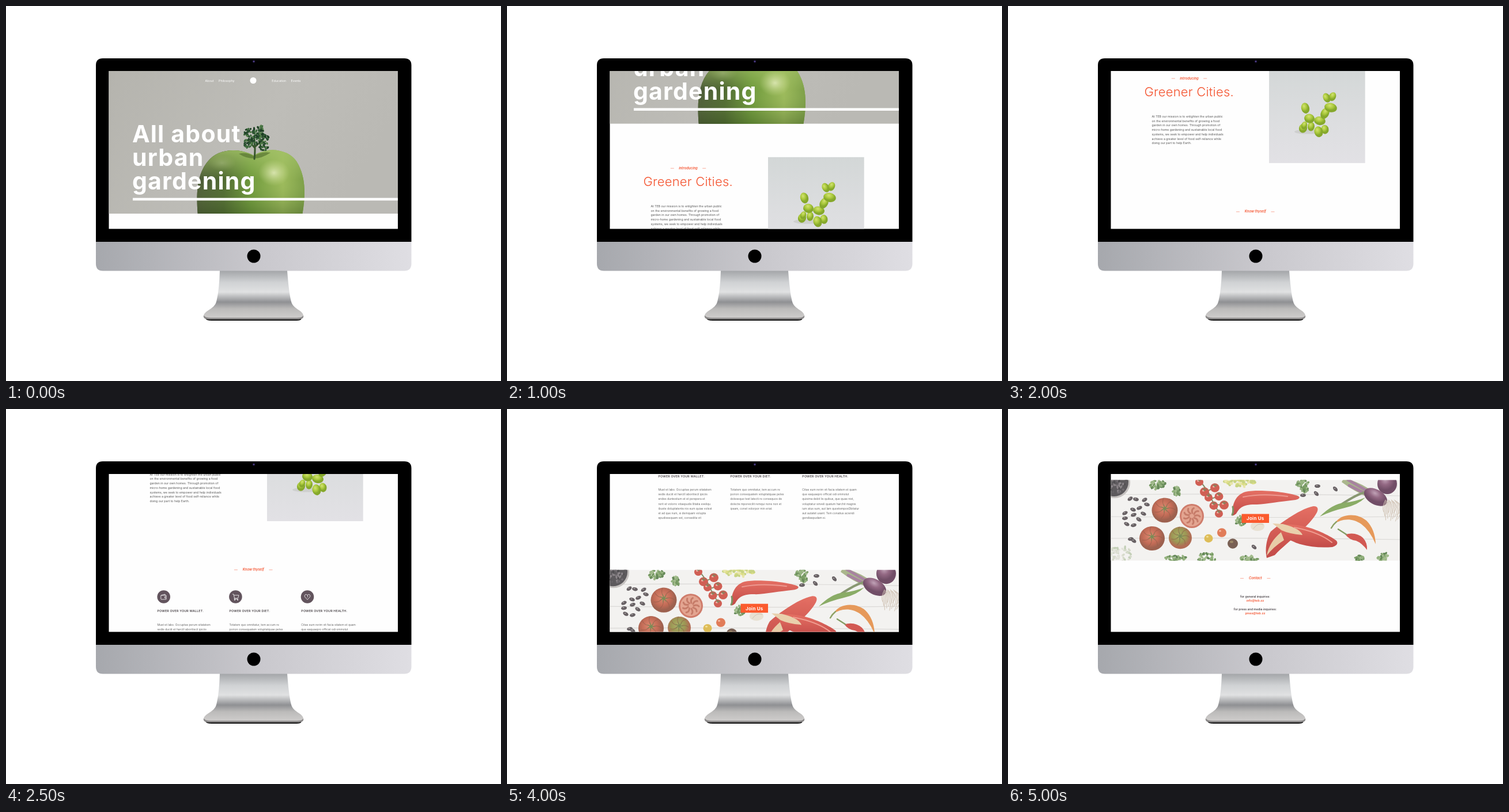
An HTML page for the animation above (7500 ms loop, 859 by 652 pixels).

```html
<!DOCTYPE html>
<html lang="en">
<head>
<meta charset="utf-8">
<title>Urban gardening</title>
<style>
html, body { margin: 0; width: 100%; height: 100%; overflow: hidden; background: #fff; }
svg { display: block; width: 859px; height: 652px; font-family: Inter, "Open Sans", sans-serif; }
.nav { font-size: 5.3px; fill: #fff; }
.headline { font-size: 41px; font-weight: 700; letter-spacing: 1.2px; fill: #fff; }
.title { font-size: 22px; font-weight: 300; letter-spacing: .2px; fill: #f4532f; }
.body { font-size: 5.2px; fill: #555; }
.column { font-size: 4.9px; fill: #666; }
.heading { font-size: 5.3px; font-weight: 600; letter-spacing: .2px; fill: #4c464a; }
.label { font-size: 5.9px; font-weight: 600; font-style: italic; fill: #f4532f; text-anchor: middle; }
.contact { font-size: 5.2px; font-weight: 600; fill: #4c464a; text-anchor: middle; }
.mail { fill: #f4532f; }
.button { font-size: 8px; font-weight: 700; letter-spacing: .2px; fill: #fff; text-anchor: middle; }
.icon { fill: none; stroke: #fff; stroke-width: .8; stroke-linejoin: round; }
.stroke { fill: none; stroke-linecap: round; }
</style>
</head>
<body>
<svg viewBox="0 0 859 652">
  <defs>
    <clipPath id="screen"><rect x="178.5" y="113" width="501.5" height="274.5"/></clipPath>
    <clipPath id="hero"><rect x="178" y="113" width="502" height="248"/></clipPath>
    <clipPath id="banner"><rect x="178" y="123.5" width="502" height="140"/></clipPath>
    <linearGradient id="chin"><stop stop-color="#a6a8ad"/><stop offset=".5" stop-color="#c8c7cc"/><stop offset="1" stop-color="#dfdee3"/></linearGradient>
    <linearGradient id="stand" x2="0" y2="1">
      <stop stop-color="#a3a5a8"/><stop offset=".25" stop-color="#d0d2d4"/><stop offset=".45" stop-color="#e0e1e2"/>
      <stop offset=".66" stop-color="#8f9093"/><stop offset=".8" stop-color="#bcbbba"/><stop offset="1" stop-color="#cfcdcc"/>
    </linearGradient>
    <linearGradient id="wall" x2="1" y2=".3"><stop stop-color="#b5b4ae"/><stop offset=".6" stop-color="#bebdb8"/><stop offset="1" stop-color="#bab9b4"/></linearGradient>
    <linearGradient id="apple"><stop stop-color="#4c5a38"/><stop offset=".25" stop-color="#4f6932"/><stop offset=".5" stop-color="#6f9a3c"/><stop offset=".8" stop-color="#9dbb5c"/><stop offset="1" stop-color="#7d9f48"/></linearGradient>
    <linearGradient id="appleTop" x2="0" y2="1"><stop stop-color="#a3c268" stop-opacity=".8"/><stop offset=".45" stop-color="#a3c268" stop-opacity="0"/><stop offset="1" stop-color="#2c4417" stop-opacity=".35"/></linearGradient>
    <radialGradient id="shine"><stop stop-color="#edf3c9" stop-opacity=".75"/><stop offset="1" stop-color="#d5e39b" stop-opacity="0"/></radialGradient>
    <linearGradient id="studio" x2="0" y2="1"><stop stop-color="#d3d7d7"/><stop offset=".6" stop-color="#dddee0"/><stop offset="1" stop-color="#e2e1e5"/></linearGradient>
    <radialGradient id="grape" cx=".4" cy=".3"><stop stop-color="#d3e273"/><stop offset=".6" stop-color="#aac93c"/><stop offset="1" stop-color="#86a82c"/></radialGradient>
    <radialGradient id="tomato" cx=".45" cy=".4"><stop stop-color="#d9785c"/><stop offset=".65" stop-color="#b9553d"/><stop offset="1" stop-color="#8e4a35"/></radialGradient>
    <radialGradient id="greenTomato" cx=".45" cy=".4"><stop stop-color="#a4a552"/><stop offset=".6" stop-color="#8c8a3c"/><stop offset="1" stop-color="#a5573b"/></radialGradient>
    <radialGradient id="onion" cx=".4" cy=".3"><stop stop-color="#b795ac"/><stop offset=".5" stop-color="#835271"/><stop offset="1" stop-color="#5c3450"/></radialGradient>
    <linearGradient id="pepper" x2="0" y2="1"><stop stop-color="#e05a4c"/><stop offset="1" stop-color="#b92f2c"/></linearGradient>
  </defs>
  <rect width="859" height="652" fill="#fff"/>

  <path d="M347 541H512Q515 547 504 547H357Q344 547 347 541Z" fill="#0b0b0b"/>
  <path d="M371 460H488Q491 500 495 514C498 527 516 529 516 539Q516 543 505 543H354Q343 543 343 539C343 530 362 527 365 514Q370 495 371 460Z" fill="url(#stand)"/>
  <path d="M343 538Q346 542 355 542H505Q514 542 516 538Q518 545 505 545H354Q341 545 343 538Z" fill="#8b8989"/>
  <path d="M156 410V103Q156 91 168 91H691Q703.500 91 703.500 103V410Z" fill="#000"/>
  <path d="M156 410H703.500V448Q703.500 460.500 691 460.500H168Q156 460.500 156 448Z" fill="url(#chin)"/>
  <circle cx="430" cy="435" r="11.500" fill="#000"/>
  <circle cx="430" cy="96.500" r="2" fill="#30215c"/><circle cx="430" cy="96.500" r=".8" fill="#6d63a8"/>

  <g clip-path="url(#screen)">
    <rect x="178" y="113" width="503" height="275" fill="#fefefe"/>
    <g id="page">
      <g clip-path="url(#hero)">
        <rect x="178" y="113" width="502" height="248" fill="url(#wall)"/>
        <g id="appleShape">
          <path id="body" d="M333 364C329 320 333 287 354 266C373 247 407 247 430 260C452 245 488 247 504 270C521 296 520 330 514 364Z" fill="url(#apple)"/>
          <use href="#body" style="fill:url(#appleTop)"/>
          <path d="M333 364C329 320 333 287 354 266C373 247 407 247 430 260C452 245 488 247 504 270C521 296 520 330 514 364Z" fill="url(#appleTop)"/>
          <ellipse cx="465" cy="290" rx="27" ry="23" fill="url(#shine)"/>
          <ellipse cx="375" cy="273" rx="24" ry="14" fill="url(#shine)" opacity=".3"/>
          <path d="M404 257Q431 274 459 255Q444 252 430 261Q417 253 404 257Z" fill="#53702d" opacity=".65"/>
        </g>
        <path d="M431 266Q433 248 431 232M432 247L421 234M432 245L446 232" class="stroke" stroke="#38562c" stroke-width="3"/>
        <g id="sprig"></g>
      </g>
      <g class="nav"><text x="345.500" y="131.800">About</text><text x="369" y="131.800">Philosophy</text><text x="461.300" y="131.800">Education</text><text x="494.600" y="131.800">Events</text></g>
      <circle cx="429" cy="129.500" r="5.500" fill="#fff"/>
      <rect x="220" y="333.700" width="460" height="4.500" fill="#fff"/>

      <text class="title" x="236.500" y="469">Greener Cities.</text>
      <rect x="453" y="419" width="166.700" height="166.500" fill="url(#studio)"/>
      <ellipse cx="521" cy="531" rx="24" ry="4" fill="#aeb2a8" opacity=".35"/>
      <g id="grapes" fill="url(#grape)"></g>

      <g id="icons" fill="#62545d"><circle cx="273.700" cy="717" r="11.300"/><circle cx="398.400" cy="717" r="11.300"/><circle cx="523" cy="717" r="11.300"/></g>
      <g class="icon">
        <path d="M269.500 714.500H278V721.500H269.500Q268.800 721.500 268.800 720.500V714.500L276 712.500V714.500M278 716.800H275.500V719.200H278"/>
        <path d="M393 712.500H395L396.500 719.500H402.500L404 714.300H395.500M396.500 719.500L396 721H403"/><circle cx="397" cy="722.500" r=".7"/><circle cx="402" cy="722.500" r=".7"/>
        <path d="M523 722L518.800 717.500C516.500 714 521 711 523 714.500C525 711 529.500 714 527.200 717.500ZM523 714.500L524 716.500L522.500 718"/>
      </g>

      <g transform="translate(0 781)">
        <g clip-path="url(#banner)">
          <rect x="178" y="123" width="502" height="141" fill="#f1f0ee"/>
          <path d="M178 149Q420 146 680 151M178 187Q450 190 680 187M178 225Q400 223 680 227" class="stroke" stroke="#d5d3d0" stroke-width="1.200"/>
          <circle cx="185" cy="128" r="27" fill="#bdb9b7"/><circle cx="184" cy="127" r="25" fill="#454245"/>
          <g id="bowl"></g>
          <g id="greens"></g>
          <g id="beans" fill="#514a4d"></g>
          <path d="M333 125Q350 146 354 158T370 183M342 144L359 137M352 156L366 152M357 166L375 167" class="stroke" stroke="#718053" stroke-width="2"/>
          <g id="tomatoes"></g>
          <circle cx="319" cy="186" r="21" fill="#c86955"/><circle cx="319" cy="186" r="18" fill="#df9780"/>
          <g id="slice" class="stroke" stroke="#bd6853" stroke-width="3"></g>

          <path d="M389 184C389 165 395 149 412 144C435 139 483 144 503 151Q510 155 499 158C470 161 451 165 432 166C407 165 401 173 396 182Q390 187 389 184Z" fill="url(#pepper)"/>
          <path d="M408 153Q440 146 485 152" class="stroke" stroke="#f2a298" stroke-width="2" opacity=".7"/>
          <path d="M389 184Q392 178 390 170" class="stroke" stroke="#69824b" stroke-width="3"/>
          <path d="M449 259C445 242 450 222 456 213C476 195 509 173 530 169Q541 169 536 180C521 207 482 233 463 254Z" fill="url(#pepper)"/>
          <path d="M449 255C452 238 461 225 474 214L479 228Q460 240 449 255Z" fill="#e4c49b"/>
          <path d="M470 203C500 194 548 213 570 229Q575 236 563 240C528 243 492 235 475 217Z" fill="url(#pepper)"/>
          <path d="M459 199L477 200C500 206 508 212 511 219Q488 217 475 211Z" fill="#e6c9a0"/>
          <path d="M497 206Q540 214 562 232" class="stroke" stroke="#ee8f82" stroke-width="2"/>

          <path d="M583 120Q613 128 632 143L628 155Q600 143 579 127Z" fill="#9dab7b"/>
          <path d="M590 123L631 147M592 133L628 151" class="stroke" stroke="#9a7191" stroke-width="5"/>
          <path d="M619 145Q606 148 580 165" class="stroke" stroke="#77895d" stroke-width="4"/>
          <path d="M541 187Q563 165 583 163T620 154Q607 167 584 172Q562 177 541 187Z" fill="#79a04f"/>
          <ellipse cx="658" cy="130" rx="17" ry="18" fill="url(#onion)"/>
          <ellipse cx="638" cy="153" rx="22" ry="13" transform="rotate(30 638 153)" fill="url(#onion)"/>
          <g id="roots" class="stroke" stroke="#c9b9a8" stroke-width="1"></g>
          <path d="M567 199C577 181 606 180 622 194Q637 209 638 235Q628 211 613 200C594 187 577 193 567 199Z" fill="#e28a41"/>
          <path d="M561 207Q564 201 570 196" class="stroke" stroke="#7d944f" stroke-width="2.500"/>
          <path d="M585 218Q604 213 616 224Q624 233 623 245Q614 233 604 229Q593 228 585 218Z" fill="#cb4039"/>
          <path d="M573 209L587 218" class="stroke" stroke="#74904e" stroke-width="2.500"/>
          <ellipse cx="433" cy="204" rx="12" ry="8" fill="#e4dccb"/><path d="M426 208Q433 197 443 201" class="stroke" stroke="#c9bda9"/>
          <rect x="178" y="123" width="502" height="141" fill="#fff" opacity=".13"/>
        </g>
        <rect x="405.500" y="182.500" width="47.500" height="15.500" fill="#fb5a2e"/>
        <text class="button" x="429.300" y="193.400">Join Us</text>
      </g>
    </g>
  </g>
</svg>
<script>
const $ = id => document.getElementById(id);
const add = (id, markup) => $(id).insertAdjacentHTML("beforeend", markup);

let seed = 7;
const random = () => (seed = seed * 16807 % 2147483647) / 2147483647;
const pick = list => list[Math.floor(random() * list.length)];

const ellipse = (x, y, rx, ry, turn = 0, fill = "") =>
  `<ellipse cx="${x}" cy="${y}" rx="${rx}" ry="${ry}" transform="rotate(${turn} ${x} ${y})" ${fill && `fill="${fill}"`}/>`;

const lines = (style, x, y, pitch, rows) => add("page", rows.map((row, i) =>
  `<text class="${style}" x="${x}" y="${y + i * pitch}">${row}</text>`).join(""));

// Loose cluster of small leaves inside an ellipse
function foliage(id, x, y, rx, ry, count, size, colors) {
  for (let i = 0; i < count; i++) {
    const angle = random() * Math.PI * 2, reach = Math.sqrt(random());
    add(id, ellipse(x + Math.cos(angle) * rx * reach, y + Math.sin(angle) * ry * reach,
      size * (.6 + random() * .6), size * .6, random() * 180, pick(colors)));
  }
}

function label(text, y, halfWidth) {
  lines("label", 429.3, y, 0, [text]);
  dashes(429.2, y, halfWidth);
}
const dashes = (x, y, halfWidth) => add("page",
  `<path d="M${x - halfWidth} ${y - 1.6}h6M${x + halfWidth - 6} ${y - 1.6}h6" stroke="#f4532f" stroke-width=".6" opacity=".8"/>`);

const darkLeaves = ["#1d3d24", "#2b5232", "#3c693b", "#23472a", "#517c48"];
[[422, 221], [438, 216], [447, 230], [419, 238], [434, 233], [447, 244]].forEach(([x, y]) =>
  foliage("sprig", x, y, 9, 8, 26, 2.7, darkLeaves));

[[516, 490, 7, 9.5, -15], [512, 525, 7, 8, 15], [514, 520, 5, 7, 20], [526, 522, 6, 8, 5],
 [523, 508, 9, 8, 15], [550, 527, 6.5, 8, -10], [539, 531, 7.5, 9.5, -15], [541, 512, 10, 7.5, 10],
 [550, 499, 7, 10, 28], [553, 472, 6, 8.5, -28], [563, 470, 6, 8, 25], [560, 489, 11, 8, 12]
].forEach(g => add("grapes", ellipse(...g)));

const beans = [[212, 156], [222, 157], [237, 158], [241, 166], [203, 181], [217, 175], [228, 172], [235, 182],
  [218, 184], [206, 200], [218, 202], [227, 192], [213, 226], [218, 229], [203, 190], [427, 240],
  [512, 150], [535, 147], [537, 134], [568, 139]];
beans.forEach(([x, y], i) => add("beans", ellipse(x, y, 5, 3.1, i * 47 % 90 - 35)
  + ellipse(x - 1, y - 1, 1.5, .7, 0, "#aaa3a4")));
foliage("bowl", 184, 127, 23, 23, 75, 2.6, ["#343135", "#615b60", "#4e494e", "#7a7377"]);

const herb = ["#638b4c", "#84a66b", "#4e763f", "#95b27c"];
[[258, 132, 11, 8], [266, 131, 7, 5], [293, 143, 7, 7], [511, 130, 10, 7], [515, 139, 6, 5], [404, 195, 9, 9],
 [290, 260, 20, 5], [345, 258, 17, 8], [418, 260, 16, 5], [610, 260, 7, 6], [650, 257, 9, 7]]
  .forEach(([x, y, rx, ry]) => foliage("greens", x, y, rx, ry, 34, 3, herb));
foliage("greens", 402, 125, 28, 9, 55, 4, ["#d8d977", "#e5e29c", "#bfcc70"]);
foliage("greens", 195, 252, 22, 13, 55, 3, ["#d0d5c3", "#bac8ac", "#dedfd4"]);

const tomato = (x, y, r, fill) => add("tomatoes", ellipse(x, y, r, r * .96, 0, fill));
[[272, 176, 22.5, "tomato"], [250, 225, 22, "tomato"], [299, 224, 20, "greenTomato"]].forEach(([x, y, r, fill]) => {
  tomato(x, y, r, `url(#${fill})`);
  for (let i = 0; i < 7; i++) {
    const turn = i * 51.4;
    add("tomatoes", `<g transform="translate(${x} ${y - 3}) rotate(${turn})">
      <path d="M3 0Q${r * .5} -3 ${r * .8} 2" class="stroke" stroke="#7f422d" stroke-width="1.200" opacity=".55"/>
      <path d="M0 -1L9 0L0 1.500Z" fill="#667b3d"/></g>`);
  }
});
[[332, 127, 7], [341, 144, 8], [359, 137, 8], [348, 154, 7], [366, 152, 7.5], [357, 168, 7.5], [375, 167, 8], [366, 182, 7]]
  .forEach(([x, y, r]) => {
    tomato(x, y, r, "#c9473a");
    add("tomatoes", ellipse(x - 2, y - 2, 2, 1.5, 0, "#f0a296")
      + `<path d="M${x - 3} ${y - 5}l3 3l4 -3M${x} ${y - 2}v-5" class="stroke" stroke="#637747" stroke-width="1.200"/>`);
  });
tomato(371, 215, 8, "#dc6840");
tomato(348, 225, 7.5, "#d9b33f");
tomato(390, 234, 9, "#65483a");
add("tomatoes", ellipse(368, 212, 2, 1.5, 0, "#f5b398") + ellipse(346, 222, 2, 1.5, 0, "#f1dd8e")
  + ellipse(388, 231, 3, 2, 0, "#8d7750"));

for (let i = 0; i < 9; i++)
  add("slice", `<path d="M324 186Q330 183 333 187" transform="rotate(${i * 40} 319 186)"/>`);
for (let i = 0; i < 16; i++)
  add("roots", `<path d="M${655 + i * 1.3} ${158 + i % 4}Q${648 + i * 3} 172 ${652 + i * 1.7} ${179 + i * 7 % 17}"/>`);

lines("headline", 219, 237, 41.2, ["All about", "urban", "gardening"]);
lines("label", 314.5, 440, 0, ["introducing"]);
dashes(314.5, 440, 30.7);
lines("body", 249.5, 506.2, 7.75, [
  "At TEB our mission is to enlighten the urban public",
  "on the environmental benefits of growing a food",
  "garden in our own homes. Through promotion of",
  "micro-home gardening and sustainable local food",
  "systems, we seek to empower and help individuals",
  "achieve a greater level of food self-reliance while",
  "doing our part to help Earth."]);
label("Know thyself", 671.8, 33.3);

[[262.5, "WALLET", [
  "Must et labo. Occuptas perum sitatatem",
  "sedis duciit et harcill aboritiscil ipiciis",
  "endes duntestium et et perepera et",
  "rerit et volorro vitaepudis llitatia eveliqu",
  "ibuste doluptatente nis eum quiae volest",
  "et ad que num, si demquam volupta",
  "epudissequam est, consedita vit"]],
 [387.5, "DIET", [
  "Totatem quo omnitatur, tem accum re",
  "porion consequatem voluptatquae peles",
  "dolesequo test latecti re consequos de",
  "dolecte mporeicilit remqui none non et",
  "ipsam, conet volorpor min eriat."]],
 [512.3, "HEALTH", [
  "Citae eum rerim vit facia sitatem et quam",
  "que eaquaepro officat odi ommolut",
  "quisima debit lis quibus, que quae nist,",
  "voluptatur sinveli quatum harchit magnis",
  "ium atus sum, aut lam quostemposObitatur",
  "aut autatet usant. Tem conatius aciendi",
  "gendiaepudam si."]]
].forEach(([x, topic, rows]) => {
  lines("heading", x, 743.4, 0, [`POWER OVER YOUR ${topic}.`]);
  lines("column", x, 767, 8.12, rows);
});

label("Contact", 1077, 26.2);
lines("contact", 429, 1108.8, 22.2, ["for general inquiries:", "for press and media inquiries:"]);
lines("contact mail", 429, 1115.6, 22.1, ["info@teb.zz", "press@teb.zz"]);

// The page jumps ten even steps, then rests until the loop restarts
const LOOP = 7500, STEP = 500, JUMP = 78.1;
function draw() {
  const step = Math.min(10, Math.floor(performance.now() % LOOP / STEP));
  $("page").setAttribute("transform", `translate(0 ${-JUMP * step})`);
  requestAnimationFrame(draw);
}
draw();
</script>
</body>
</html>
```
